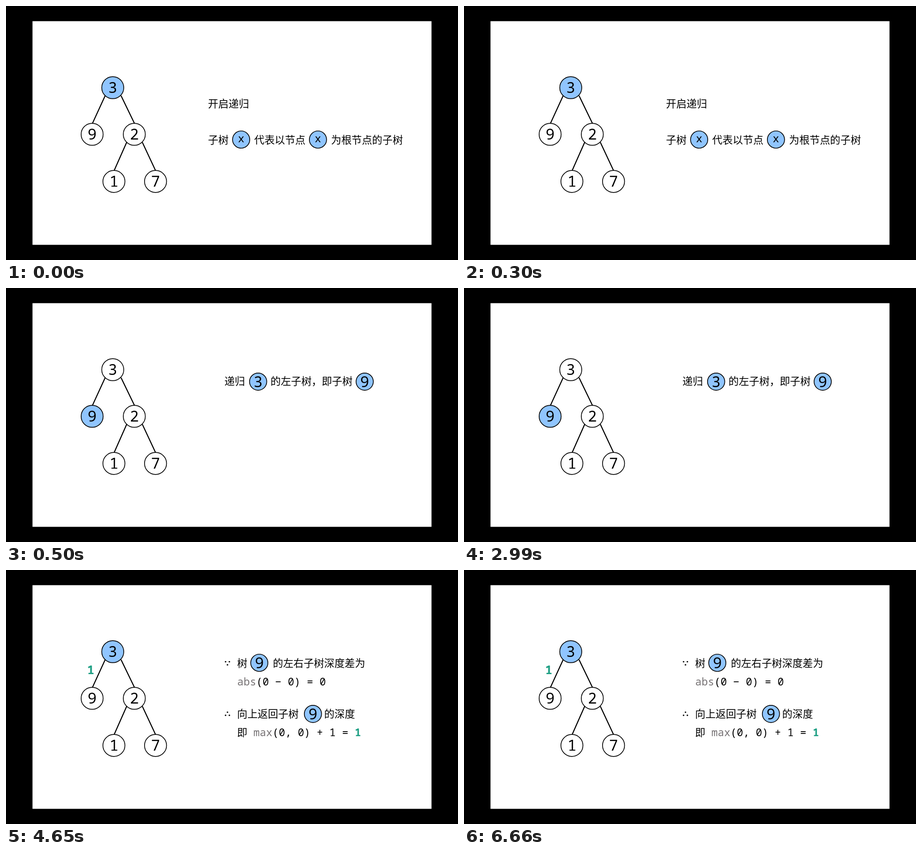
An HTML page for the animation above (8000 ms loop, 998x561 px).

```html
<!DOCTYPE html>
<html lang="zh-CN">
<head>
<meta charset="utf-8">
<title>递归</title>
<style>
  html, body { margin: 0; width: 100%; height: 100%; overflow: hidden; background: #000; }
  svg { display: block; width: 100vw; height: 100vh; }
  text { white-space: pre; fill: #000; }
  .zh { font: 22.65px "Noto Sans CJK SC", "Noto Sans CJK", sans-serif; }
  .code { font: 23.3px "Noto Sans Mono", monospace; }
  .digit { font: 33px "Noto Sans Mono", monospace; text-anchor: middle; }
  .var { font: 24px "Noto Sans Mono", monospace; text-anchor: middle; }
  .fn { fill: #777375; }
  .depth { fill: #20a085; font-weight: 700; }
  circle { stroke: #000; stroke-width: 1.7; }
  circle.dot { stroke: none; }
  line { stroke: #000; stroke-width: 2.3; }
</style>
</head>
<body>
<svg id="stage" viewBox="0 0 998 561"></svg>
<script>
const LOOP = 8000, BLUE = '#90c5ff';
const stage = document.getElementById('stage');

const nodes = [
  ['3', 235.7, 180.4], ['9', 190.2, 283.4], ['2', 283.3, 283.4],
  ['1', 238.3, 387.5], ['7', 330.2, 387.5]
];
const edges = [
  [219, 198, 191, 259], [254, 198, 283.5, 259],
  [266.5, 301, 239, 363], [301, 301, 330, 363]
];

const text = (cls, x, y, s) => `<text class="${cls}" x="${x}" y="${y}">${s}</text>`;
const zh = (x, y, s) => text('zh', x, y, s);
const code = (x, y, s) => text('code', x, y, s);
const span = (cls, s) => `<tspan class="${cls}">${s}</tspan>`;
const circle = (x, y, r, fill) => `<circle cx="${x}" cy="${y}" r="${r}" fill="${fill}"/>`;
const dot = (x, y) => `<circle class="dot" cx="${x}" cy="${y}" r="1.7"/>`;

function badge(x, y, s) {
  const label = s === 'x' ? text('var', x, y + 6.3, s) : text('digit', x, y + 11.8, s);
  return circle(x, y, 19, BLUE) + label;
}

// Three dots: dir 1 is "because", dir -1 is "therefore"
const dots = (x, y, dir) =>
  dot(x - 4.2, y - 3.4 * dir) + dot(x + 4.2, y - 3.4 * dir) + dot(x, y + 3.4 * dir);

function tree(active) {
  return edges.map(([a, b, c, d]) => `<line x1="${a}" y1="${b}" x2="${c}" y2="${d}"/>`).join('') +
    nodes.map(([s, x, y]) =>
      circle(x, y, 24.3, s === active ? BLUE : '#fff') + text('digit', x, y + 11.6, s)).join('');
}

const scenes = [
  { start: 0, active: '3', body:
    zh(446, 224.3, '开启递归') +
    zh(446, 303.6, '子树') + badge(519.2, 295, 'x') +
    zh(548, 303.6, '代表以节点') + badge(688.8, 295, 'x') +
    zh(717.8, 303.6, '为根节点的子树') },
  { start: 500, active: '9', body:
    zh(482.3, 214.3, '递归') + badge(556.7, 206.8, '3') +
    zh(584, 214.3, '的左子树，即子树') + badge(792, 206.8, '9') },
  { start: 4650, active: '3', body:
    `<text class="code depth" x="187" y="230.3" text-anchor="middle" style="font-size:27px">1</text>` +
    dots(489, 206, 1) + zh(510.3, 214.3, '树') + badge(559.3, 205, '9') +
    zh(589.3, 214.3, '的左右子树深度差为') +
    code(510.5, 255, span('fn', 'abs') + '(0 − 0) = 0') +
    dots(489, 317.5, -1) + zh(510.3, 325.6, '向上返回子树') + badge(677.7, 317.8, '9') +
    zh(702.6, 325.6, '的深度') +
    zh(510.3, 366.8, '即') +
    code(546.3, 366.6, span('fn', 'max') + '(0, 0) + 1 = ' + span('depth', '1')) }
];

let shown = null;
function draw(t) {
  const scene = scenes.filter(s => s.start <= t).pop();
  if (scene === shown) return;
  shown = scene;
  stage.innerHTML = '<rect width="998" height="561"/>' +
    '<rect x="58.5" y="33.5" width="881" height="494" fill="#fff"/>' +
    tree(scene.active) + scene.body;
}

const origin = performance.now();
function tick() {
  draw((performance.now() - origin) % LOOP);
  requestAnimationFrame(tick);
}
tick();
</script>
</body>
</html>
```
